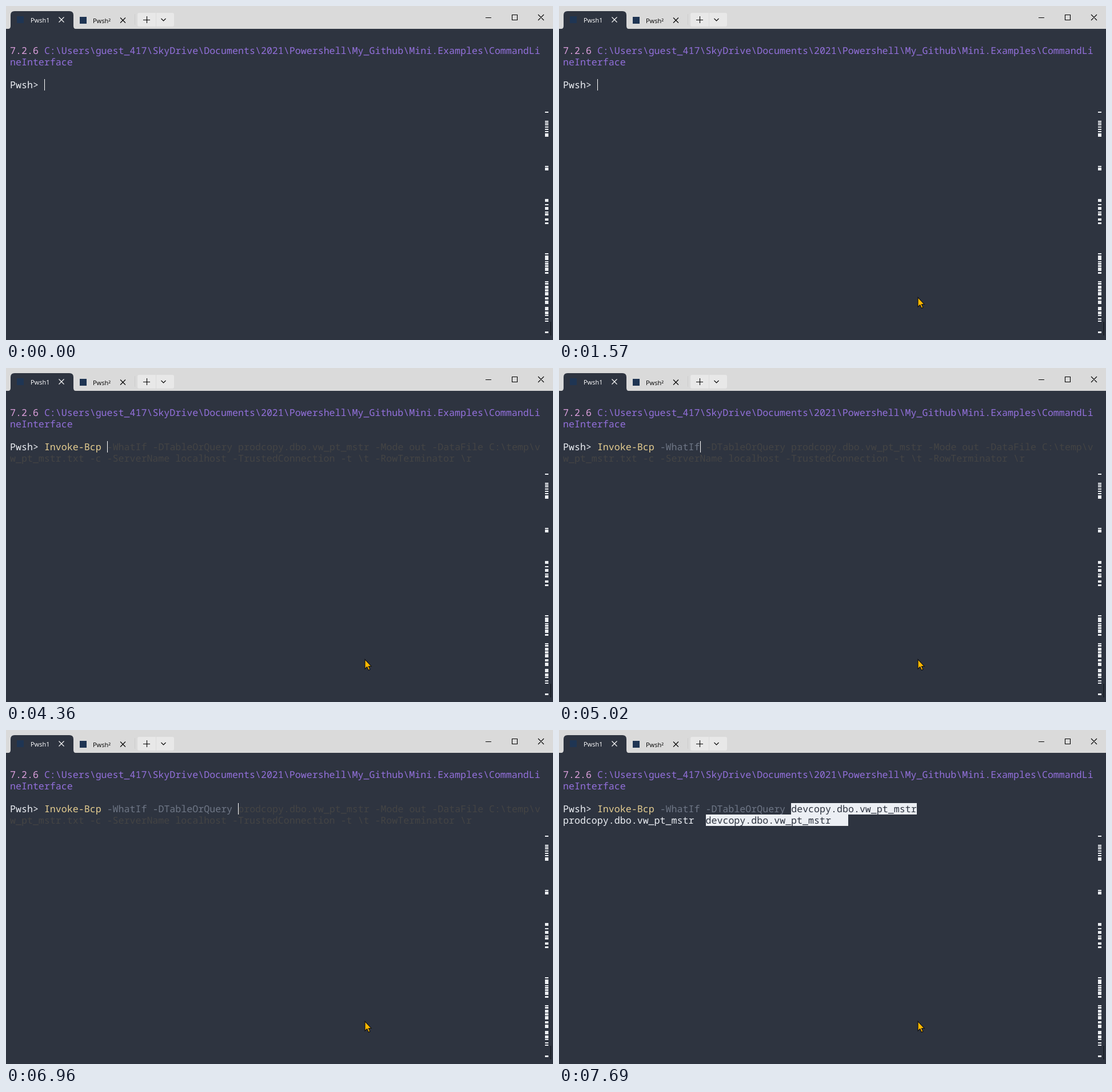
An HTML page that plays this animation: 957x585 px, repeating every 8 s.

```html
<!DOCTYPE html>
<html lang="en">
<head>
<meta charset="utf-8">
<title>Terminal</title>
<style>
  html, body { margin: 0; width: 100%; height: 100%; overflow: hidden; background: #2e3440; }
  svg { display: block; width: 957px; height: 585px; }
  text { white-space: pre; }
  .mono { font: 16.633px "Noto Sans Mono", monospace; font-variant-ligatures: none; text-rendering: geometricPrecision; }
  .tab { font: 11px "Open Sans", sans-serif; }
  .line { fill: none; stroke: #000; stroke-width: 1.1; }
</style>
</head>
<body>
<svg viewBox="0 0 957 585">
  <rect width="957" height="585" fill="#2e3440"/>
  <rect width="957" height="40" fill="#dadada"/>

  <path d="M4 40Q8 40 8 35V16Q8 9 15 9H111Q118 9 118 16V35Q118 40 122 40Z" fill="#2e3440"/>
  <rect x="19" y="18" width="12" height="12" fill="#1f3553"/>
  <text class="tab" x="43" y="29" fill="#fff" font-weight="600">Pwsh1</text>
  <path class="line" d="M92.500 19.500l9 9m0-9l-9 9" style="stroke:#fff"/>

  <rect x="129" y="19" width="12" height="12" fill="#1f3553"/>
  <text class="tab" x="152" y="30">Pwsh²</text>
  <path class="line" d="M200 20.500l9 9m0-9l-9 9"/>
  <path class="line" d="M225.500 14v19" style="stroke:#cecece"/>

  <rect x="230" y="12" width="64" height="24" rx="3" fill="#e8e8e8"/>
  <path class="line" d="M262.500 12v24" style="stroke:#dadada"/>
  <path class="line" d="M240 24.500h12M246.500 18v12M271.500 22l4 4 4-4"/>
  <path class="line" d="M839 20.500h10M885.500 15.500h9v9h-9zM931 15l10 10m0-10l-10 10"/>

  <g id="marks" fill="#eceff4"></g>
  <rect x="952" y="553" width="2" height="24" fill="#1c2029"/>
  <g id="header"></g>
  <g id="prompt"></g>
  <rect id="caret" y="128" width="1" height="20" fill="#fff"/>
  <path id="pointer" d="M0 0V16.500L3.700 13 6.200 18.700 8.800 17.600 6.400 12H11Z" fill="#ffb900" stroke="#111" stroke-width="1.100"/>
</svg>
<script>
const LOOP = 8000, CELL = 9.98, LEFT = 7, COLUMNS = 93, PROMPT = 6;
const WHITE = '#eceff4', DARK = '#2e3440', YELLOW = '#e5cd90', GRAY = '#6f7786', HINT = '#444444';
const COMMAND = String.raw`Invoke-Bcp -WhatIf -DTableOrQuery prodcopy.dbo.vw_pt_mstr -Mode out -DataFile C:\temp\vw_pt_mstr.txt -c -ServerName localhost -TrustedConnection -t \t -RowTerminator \r`;
const TABLES = ['prodcopy.dbo.vw_pt_mstr', 'devcopy.dbo.vw_pt_mstr'];
const MENU_START = 7230, MENU_NEXT = 7690, MENU_WIDTH = 25;

// [time, number of command characters entered]
const TYPING = [[0, 0], [2360, 1], [2500, 2], [2600, 3], [2700, 4], [2900, 5], [2960, 6],
  [3370, 7], [3700, 8], [4100, 9], [4160, 10], [4360, 11], [4560, 12],
  [4830, 13], [4925, 14], [5020, 18], [5370, 19], [5495, 20], [5620, 21],
  [6150, 22], [6350, 23], [6610, 33], [6960, 34]];

// [top, height] of the scrollbar marks
const MARKS = [[185, 2], [201, 2], [204, 2], [207, 2], [211, 2], [215, 2], [219, 2], [223, 6],
  [280, 2], [283, 5], [338, 5], [347, 2], [352, 5], [360, 2], [363, 4], [372, 4], [379, 3],
  [433, 2], [437, 8], [447, 2], [450, 3], [454, 3], [458, 6], [466, 3], [482, 2], [485, 3],
  [490, 5], [496, 4], [501, 6], [510, 4], [516, 6], [527, 6], [535, 5], [541, 2], [547, 2],
  [551, 2], [570, 3]];

const byId = id => document.getElementById(id);
const columnX = column => LEFT + column * CELL;

function add(parent, name, attributes, content = '') {
  const node = document.createElementNS('http://www.w3.org/2000/svg', name);
  for (const key in attributes) node.setAttribute(key, attributes[key]);
  node.textContent = content;
  parent.append(node);
}

function write(parent, row, column, content, fill) {
  add(parent, 'text', { class: 'mono', x: columnX(column), y: 64 + row * 20, fill }, content);
}

function writeSelected(parent, row, column, content) {
  const x = Math.round(columnX(column)), right = Math.round(columnX(column + content.length));
  add(parent, 'rect', { x, y: 48 + row * 20, width: right - x, height: 20, fill: WHITE });
  write(parent, row, column, content, DARK);
}

function drawTyped(parent, count) {
  const partial = COMMAND[count] !== ' ';
  const typed = COMMAND.slice(0, count)
    .replace(/ -\w+$/, word => partial ? word.toLowerCase() : word);
  write(parent, 4, PROMPT, typed.slice(0, 10), YELLOW);
  write(parent, 4, PROMPT + 10, typed.slice(10).replace(/ -$/, ' '), GRAY);
  if (typed.endsWith(' -')) write(parent, 4, PROMPT + count - 1, '-', WHITE);
}

function drawPrompt(count, selected) {
  const prompt = byId('prompt');
  prompt.replaceChildren();
  write(prompt, 4, 0, 'Pwsh>', WHITE);
  if (!count) return;
  drawTyped(prompt, count);
  if (selected < 0) {
    const wrap = COLUMNS - PROMPT;
    write(prompt, 4, PROMPT + count, COMMAND.slice(count, wrap), HINT);
    write(prompt, 5, 0, COMMAND.slice(wrap), HINT);
    return;
  }
  writeSelected(prompt, 4, PROMPT + count, TABLES[selected]);
  TABLES.forEach((name, i) => {
    const column = i * MENU_WIDTH;
    if (i === selected) writeSelected(prompt, 5, column, name.padEnd(MENU_WIDTH));
    else write(prompt, 5, column, name, WHITE);
  });
}

function drawPointer(time) {
  const pointer = byId('pointer');
  pointer.style.display = time < 1240 ? 'none' : '';
  const rest = 1 - Math.min(5, Math.floor((time - 1240) / 66)) / 5;
  pointer.setAttribute('transform', `translate(${628 - 30 * rest} ${510.5 + 30 * rest * rest})`);
}

for (const [y, height] of MARKS) add(byId('marks'), 'rect', { x: 943, y, width: 6, height });
write(byId('header'), 1, 0, '7.2.6', '#dda0dd');
const path = String.raw`C:\Users\guest_417\SkyDrive\Documents\2021\Powershell\My_Github\Mini.Examples\CommandLineInterface`;
write(byId('header'), 1, PROMPT, path.slice(0, COLUMNS - PROMPT), '#9370db');
write(byId('header'), 2, 0, path.slice(COLUMNS - PROMPT), '#9370db');

let shown = '';
function draw(now) {
  const time = now % LOOP;
  const count = TYPING.findLast(([start]) => start <= time)[1];
  const selected = time < MENU_START ? -1 : time < MENU_NEXT ? 0 : 1;
  const state = `${count},${selected}`;
  if (state !== shown) drawPrompt(count, selected);
  shown = state;

  const unfocused = time >= 240 && time < 1500;
  byId('caret').style.display = unfocused || selected >= 0 ? 'none' : '';
  byId('caret').setAttribute('x', Math.round(columnX(PROMPT + count)));
  drawPointer(time);
}

const start = performance.now();
function tick() {
  draw(performance.now() - start);
  requestAnimationFrame(tick);
}
tick();
</script>
</body>
</html>
```
